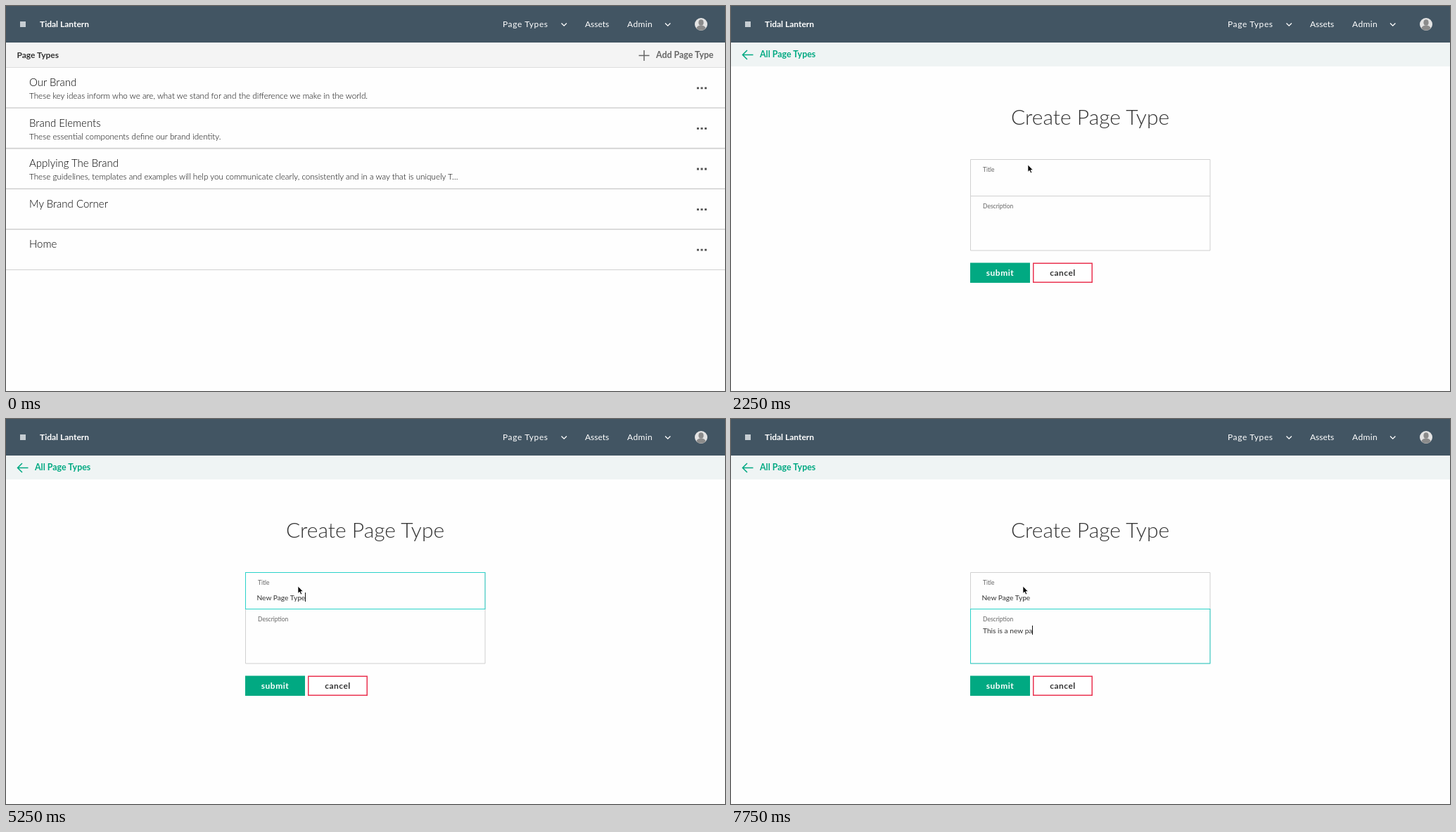
Animation of 1022 by 548 pixels, one loop 8000 ms. Source, as an HTML page:

```html
<!DOCTYPE html>
<html lang="en">
<head>
<meta charset="utf-8">
<title>Create page type</title>
<style>
  html, body { margin: 0; width: 100%; height: 100%; overflow: hidden; background: #fefefe; }
  svg { display: block; font: 12px Lato, "Open Sans", sans-serif; fill: #333; }
  text { white-space: pre; }
  .bold { font-weight: 700; }
  .nav { fill: #fff; }
  .row { font-size: 15px; font-weight: 300; fill: #000; }
  .sub { font-size: 11.7px; font-weight: 300; fill: #000; }
  .label { font-size: 8.5px; fill: #666; }
  .input { font-size: 10.2px; }
  .button { font-weight: 700; letter-spacing: .5px; text-anchor: middle; }
  .line { fill: none; stroke: #d0d0d0; }
  .focus { fill: none; stroke: #2ad2c9; }
</style>
</head>
<body>
<svg width="1022" height="548" viewBox="0 0 1022 548">
  <rect width="1022" height="52" fill="#425563"/>
  <rect x="20" y="22" width="8" height="8" fill="#c6cdd2"/>
  <g class="nav">
    <text class="bold" x="48" y="30">Tidal Lantern</text>
    <text x="706" y="30" letter-spacing=".6">Page Types</text>
    <text x="823" y="30">Assets</text>
    <text x="883" y="30" letter-spacing=".4">Admin</text>
  </g>
  <path d="M789.5 24.5l3.7 3.7 3.7-3.7M937 24.5l3.7 3.7 3.7-3.7" fill="none" stroke="#fff" stroke-width="1.3"/>
  <circle cx="988" cy="26" r="9" fill="#e4e4e4"/>
  <path d="M981.5 32a6.5 4.5 0 0 1 13 0a9 9 0 0 1-13 0z" fill="#8b8b8b"/>
  <ellipse cx="988" cy="23.5" rx="3.6" ry="4.3" fill="#8b8b8b"/>

  <g id="list">
    <rect y="52" width="1022" height="36" fill="#f4f4f4"/>
    <path class="line" d="M0 87.5h1022" stroke-opacity=".6"/>
    <text class="bold" x="15.5" y="74">Page Types</text>
    <g id="add">
      <path d="M899.5 70.5h15M907 63v15" stroke="currentColor" stroke-width="1.5"/>
      <text class="bold" x="924" y="73.5" font-size="12.4" fill="currentColor">Add Page Type</text>
    </g>
    <g id="rows"></g>
  </g>

  <g id="form">
    <rect y="52" width="1022" height="34" fill="#eff4f4"/>
    <path d="M31.5 69.5h-15M23 63l-6.5 6.5 6.5 6.5" fill="none" stroke="#01a982" stroke-width="1.5"/>
    <text class="bold" x="41" y="73" font-size="12.4" fill="#01a982">All Page Types</text>
    <text x="510.5" y="169" font-size="30" font-weight="300" text-anchor="middle">Create Page Type</text>
    <path class="line" d="M340.5 218.5h340.5v129.5h-340.5zM340.5 270.5h340.5"/>
    <text class="label" x="358" y="235.5">Title</text>
    <text class="label" x="358" y="287.5">Description</text>
    <rect class="focus" id="focus" x="340.5" width="340.5"/>
    <text class="input" id="title" x="356.5" y="257.5"></text>
    <text class="input" id="about" x="358" y="304.5"></text>
    <rect id="caret" width="1" height="13" fill="#111"/>
    <rect x="340" y="365.5" width="85" height="28.5" fill="#01a982"/>
    <text class="button" x="382.5" y="384" fill="#fff">submit</text>
    <rect x="429.75" y="366.25" width="83.5" height="27" fill="#fff" stroke="#ea3350" stroke-width="1.5"/>
    <text class="button" x="471.5" y="384">cancel</text>
  </g>

  <path id="cursor" d="M0 0v10.2l2.3-2.1 1.7 3.7 1.7-.8-1.6-3.5h3.1z" fill="#000" stroke="#fff" stroke-width=".7"/>
</svg>
<script>
const el = id => document.getElementById(id);
const set = (id, attrs) => { for (const k in attrs) el(id).setAttribute(k, attrs[k]); };
const show = (id, on) => { el(id).style.display = on ? "" : "none"; };

const rows = [
  ["Our Brand", "These key ideas inform who we are, what we stand for and the difference we make in the world."],
  ["Brand Elements", "These essential components define our brand identity."],
  ["Applying The Brand", "These guidelines, templates and examples will help you communicate clearly, consistently and in a way that is uniquely T…"],
  ["My Brand Corner", ""],
  ["Home", ""]
];
el("rows").innerHTML = rows.map(([name, note], i) => {
  const y = 88 + i * 57.6, last = i === rows.length - 1;
  return `<text class="row" x="33" y="${y + 26}">${name}</text>
    <text class="sub" x="33" y="${y + 44}">${note}</text>
    <path d="M982 ${y + 28.8}h14" stroke="#555" stroke-width="2.8" stroke-dasharray="3 2.5"/>
    <path class="line" d="M0 ${y + 57}h1022" stroke-width="${last ? 1 : 1.6}"/>`;
}).join("");

// Pointer stops: time, x, y
const stops = [
  [250, 741, 122], [500, 799, 112], [750, 900, 78], [1000, 908.5, 67],
  [2250, 422, 226], [2500, 415, 238]
];
const TITLE = "New Page Type", ABOUT = "This is a new page type";

// Characters typed at time t, running linearly from (t0, n0) to (t1, n1)
const typed = (t, t0, n0, t1, n1) =>
  Math.round(n0 + (n1 - n0) * Math.min(1, Math.max(0, (t - t0) / (t1 - t0))));

function draw(t) {
  const onForm = t >= 1750, inAbout = t >= 5500;
  show("list", !onForm);
  show("form", onForm);
  el("add").style.color = t >= 750 ? "#000" : "#666";

  const stop = stops.filter(s => s[0] <= t).pop();
  show("cursor", stop);
  if (stop) set("cursor", { transform: `translate(${stop[1]} ${stop[2]})` });
  if (!onForm) return;

  const count = t < 4250 ? typed(t, 3000, 0, 4250, 6) : typed(t, 4250, 6, 5250, 13);
  el("title").textContent = TITLE.slice(0, count);
  el("about").textContent = ABOUT.slice(0, typed(t, 5750, 0, 7750, 16));

  show("focus", t >= 3000);
  show("caret", t >= 3000);
  set("focus", inAbout ? { y: 270.5, height: 77.5 } : { y: 218.5, height: 52 });
  const field = el(inAbout ? "about" : "title");
  const width = field.textContent ? field.getComputedTextLength() : 0;
  set("caret", { x: Math.round(+field.getAttribute("x") - .5 + width), y: inAbout ? 294 : 247 });
}

const start = performance.now(), STEP = 250;
function tick() {
  const t = (performance.now() - start) % 8000;
  draw(Math.floor(t / STEP) * STEP);
  requestAnimationFrame(tick);
}
tick();
</script>
</body>
</html>
```
